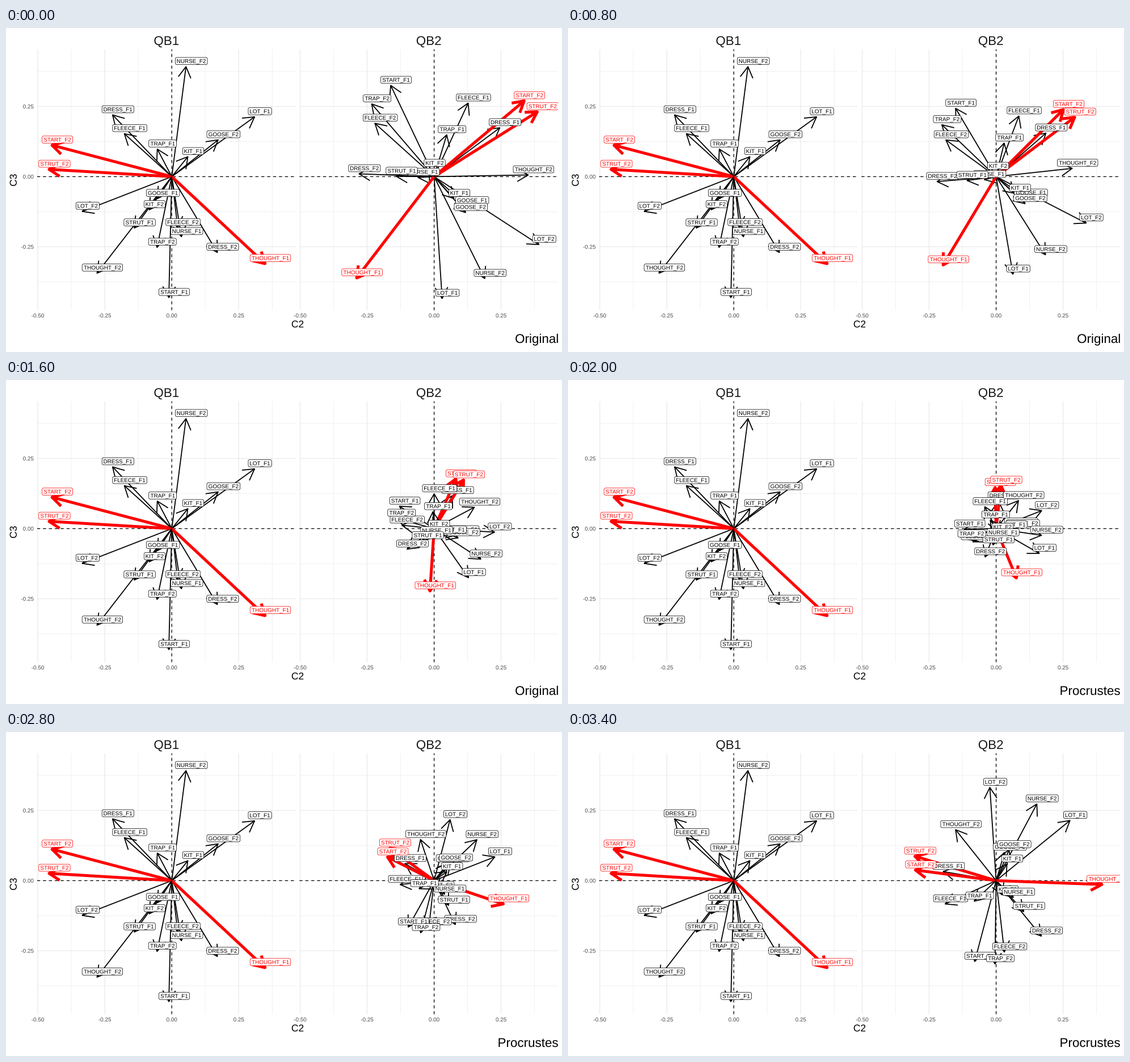
A matplotlib script that plays this animation: 980 px wide and 572 px high, repeating every 8 s.

```python
import numpy as np
import matplotlib.pyplot as plt
from matplotlib.animation import FuncAnimation
from matplotlib.patches import FancyBboxPatch, PathPatch, Rectangle
from matplotlib.textpath import TextPath
from matplotlib.transforms import Affine2D

plt.rcParams["font.family"] = "Liberation Sans"
W, H, DPI = 980, 572, 100
PT = 72 / DPI                     # points per pixel

TOP, BOTTOM, Y0 = 37.5, 498.2, 262.4
LEFT, WIDTH, X0, SHIFT = 54.9, 455.7, 292.2, 462.4
UX, UY = 472.2, 495.4             # pixels per data unit
NUDGE = 0.02 + 0.02j
HEAD = 22.3
FRAMES, HOLD, STEPS = 80, 4, 30

# Loadings C2 + C3j of each vowel: QB1 F1, QB1 F2, QB2 F1, QB2 F2
LOADINGS = {
    "DRESS": (-.221+.220j, .170-.270j, .245+.174j, -.280+.010j),
    "FLEECE": (-.177+.153j, .022-.182j, .127+.262j, -.221+.190j),
    "GOOSE": (-.053-.078j, .173+.131j, .122-.104j, .117-.128j),
    "KIT": (.060+.071j, -.084-.118j, .074-.078j, -.018+.029j),
    "LOT": (.309+.213j, -.334-.124j, .030-.434j, .391-.242j),
    "NURSE": (.036-.214j, .053+.392j, -.060-.003j, .189-.363j),
    "START": (-.011-.431j, -.447+.112j, -.162+.325j, .336+.270j),
    "STRUT": (-.140-.183j, -.458+.026j, -.141+.001j, .385+.231j),
    "THOUGHT": (.348-.310j, -.279-.344j, -.289-.361j, .351+.006j),
    "TRAP": (-.054+.098j, -.055-.252j, .047+.149j, -.233+.259j),
}
NAMES = [f"{v}_F{k}" for v in LOADINGS for k in (1, 2)]
RED = {"START_F2", "STRUT_F2", "THOUGHT_F1"}

table = np.array(list(LOADINGS.values()))
qb1, raw = table[:, :2].ravel(), table[:, 2:].ravel()
# Procrustes fit: centre, scale and rotate
fitted = 0.786 * np.exp(1j * np.radians(130.5)) * (raw - raw.mean())

fig = plt.figure(figsize=(W / DPI, H / DPI), dpi=DPI, facecolor="white")
ax = fig.add_axes([0, 0, 1, 1])
ax.set(xlim=(0, W), ylim=(H, 0))
ax.axis("off")


def write(s, x, base, size, color="black", align=0.5, angle=0):
    """Draw text with its baseline at base; align is 0, 0.5 or 1."""
    path = TextPath((0, 0), s, size=size)
    box = path.get_extents()
    place = (Affine2D().translate(-box.x0 - align * box.width, 0)
             .scale(1, -1).rotate_deg(angle).translate(x, base))
    return ax.add_patch(PathPatch(path, fc=color, lw=0, zorder=2,
                                  transform=place + ax.transData))


def rule(x, y, color, width, **kw):
    ax.plot(x, y, color=color, lw=width * PT, solid_capstyle="butt",
            dash_capstyle="butt", snap=False, **kw)


class Vector:
    """An arrow from the panel's origin with a boxed name near its tip."""

    def __init__(self, name, x0, clip):
        self.x0 = x0
        color = "red" if name in RED else "black"
        self.line, = ax.plot([], [], color=color, zorder=3,
                             lw=(5.1 if name in RED else 1.8) * PT,
                             solid_capstyle="butt", solid_joinstyle="round")
        self.place = Affine2D()
        path = TextPath((0, 0), name, size=9.9)
        ink = path.get_extents()
        path = (Affine2D().translate(-ink.x0 - ink.width / 2, 0).scale(1, -1)
                .translate(0, 3.55).transform_path(path))
        w, h = ink.width + 6.2, 12.6
        frame = FancyBboxPatch((-w / 2, -h / 2), w, h, fc="white", ec=color,
                               boxstyle="round,pad=0,rounding_size=2.7", lw=0.75 * PT)
        for part in (frame, PathPatch(path, fc=color, lw=0)):
            part.set(zorder=4, transform=self.place + ax.transData)
            ax.add_patch(part)
            part.set_clip_path(clip)
        self.line.set_clip_path(clip)

    def pixel(self, z):
        return np.array([self.x0 + UX * z.real, Y0 - UY * z.imag])

    def move(self, z):
        self.place.clear().translate(*self.pixel(z + NUDGE))
        root, tip = self.pixel(0j), self.pixel(z)
        back = np.arctan2(*(root - tip)[::-1])
        a, b = (tip + HEAD * np.array([np.cos(t), np.sin(t)])
                for t in (back - np.pi / 6, back + np.pi / 6))
        points = [root, tip, (np.nan, np.nan), a, tip, b]
        self.line.set_data(*np.array(points).T)


def panel(title, dx):
    left, right, x0 = LEFT + dx, LEFT + dx + WIDTH, X0 + dx
    for odd in (1, 0):            # minor lines lie under major ones
        width = 0.7 if odd else 1.3
        for k in range(-4, 4):
            if k % 2 == odd:
                x = x0 + k * UX / 8
                rule([x, x], [BOTTOM, TOP], "#EBEBEB", width, zorder=1)
                if k > -4:
                    y = Y0 - k * UY / 8
                    rule([left, right], [y, y], "#EBEBEB", width, zorder=1)
    dashed = dict(linestyle=(0, (4, 4)), zorder=2)
    rule([left, right], [Y0, Y0], "black", 1.3, **dashed)
    rule([x0, x0], [BOTTOM, TOP], "black", 1.3, **dashed)
    for v in (-0.5, -0.25, 0, 0.25):
        write(f"{v:.2f}", x0 + v * UX, 511, 9.9, "#4D4D4D")
    write(title, (left + right) / 2, 30, 22.4, "#1A1A1A")
    clip = Rectangle((left, TOP), WIDTH, BOTTOM - TOP, transform=ax.transData)
    return [Vector(name, x0, clip) for name in NAMES]


fixed = panel("QB1", 0)
moving = panel("QB2", SHIFT)
for vector, z in zip(fixed, qb1):
    vector.move(z)

for v in (-0.25, 0, 0.25):
    write(f"{v:.2f}", 48.5, Y0 - v * UY + 3.5, 9.9, "#4D4D4D", align=1)
write("C2", 514, 528.6, 17.4)
write("C3", 18.8, 268.6, 17.4, angle=-90)
captions = [write(s, 972.8, 556, 22.4, align=1) for s in ("Original", "Procrustes")]


def update(i):
    t = min(max(i - HOLD, 0), STEPS) / STEPS
    for vector, z in zip(moving, raw + t * (fitted - raw)):
        vector.move(z)
    captions[0].set_visible(t < 0.5)
    captions[1].set_visible(t >= 0.5)
    return []


anim = FuncAnimation(fig, update, frames=FRAMES, interval=100,
                     repeat=True, repeat_delay=0, blit=False)
plt.show()
```
